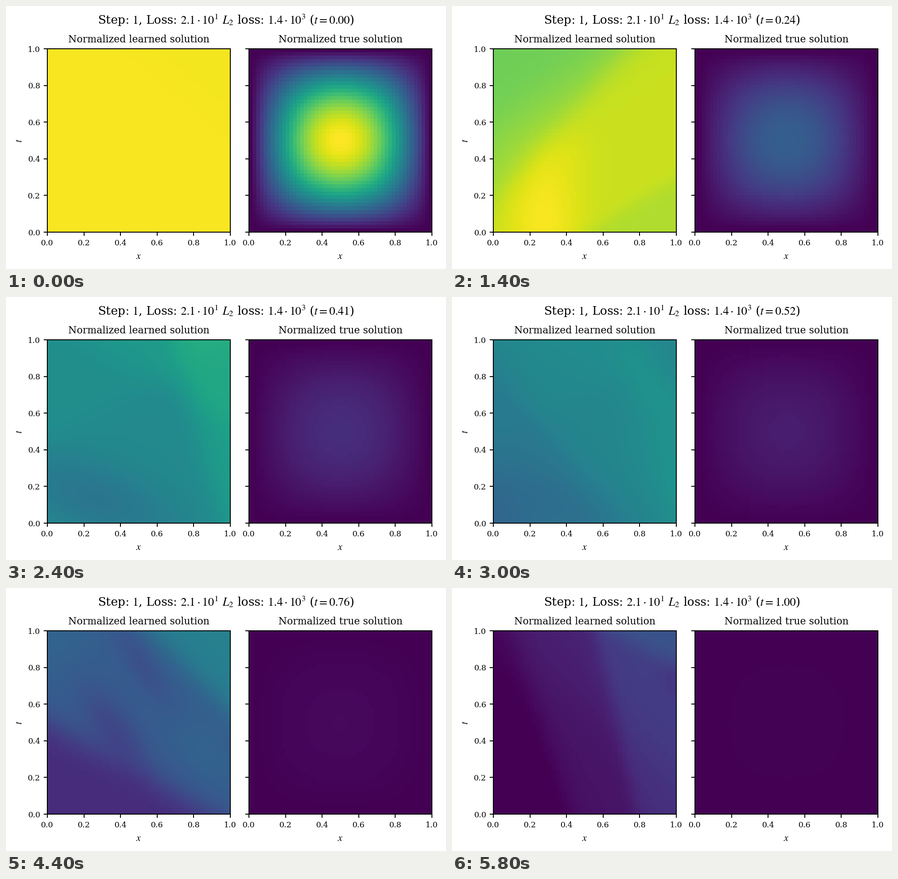
A matplotlib script for the animation above (6000 ms loop, 969 by 578 pixels).

```python
import numpy as np
import matplotlib.pyplot as plt
from matplotlib.animation import FuncAnimation

W, H, DPI = 969, 578, 155
FRAMES, INTERVAL = 30, 200
CELLS = 50
LINE = 2 * 72 / DPI  # two pixels in points

plt.rcParams.update({
    "font.family": "DejaVu Serif",
    "mathtext.fontset": "stix",
    "font.size": 10,
    "axes.titlesize": 10,
    "axes.titlepad": 6.5,
    "axes.labelsize": 10,
    "axes.linewidth": LINE,
    "xtick.labelsize": 8,
    "xtick.major.width": LINE,
    "xtick.major.pad": 4,
    "ytick.labelsize": 8,
    "ytick.major.width": LINE,
})

X, Y = np.meshgrid(np.linspace(0, 1, CELLS), np.linspace(0, 1, CELLS))


def step(amp, angle, offset, width):
    """Soft step across a straight line."""
    a = np.radians(angle)
    p = X * np.cos(a) + Y * np.sin(a)
    return amp / (1 + np.exp((offset - p) / width))


def bump(amp, x, y, angle, along, across):
    """Rotated Gaussian hill or valley."""
    a = np.radians(angle)
    u = (X - x) * np.cos(a) + (Y - y) * np.sin(a)
    v = (Y - y) * np.cos(a) - (X - x) * np.sin(a)
    return amp * np.exp(-(u / along) ** 2 - (v / across) ** 2)


# Learned surface at a few moments, blended linearly in between.
KEYS = np.array([0, 3, 7, 12, 18, 22, 29])
SURFACES = np.array([
    0.99 + step(-0.008, 50, 1.1, 0.06),
    0.987 + step(-0.042, 32, 1.16, 0.045) + bump(-0.012, 0, 1, 0, 0.2, 0.2),
    0.92 + step(-0.07, 139, 0.11, 0.04) + step(-0.07, 125, 0.45, 0.08)
    + step(-0.04, -60, 0.26, 0.025)
    + bump(0.07, 0.27, 0.05, 0, 0.2, 0.3) + bump(0.025, 0.33, 0.4, 50, 0.22, 0.18),
    0.47 + step(0.09, 15, 0.93, 0.045) + step(0.04, 60, 0.98, 0.04)
    + step(0.025, 118, 0.396, 0.04) + bump(-0.08, 0.25, 0.13, -20, 0.45, 0.19),
    0.185 + step(0.14, 40, 0.1, 0.05) + step(0.115, 34.5, 0.505, 0.055)
    + step(-0.15, 40, 1.26, 0.055) + bump(0.035, 0.95, 0.22, -60, 0.4, 0.17)
    + bump(-0.02, 0.17, 0.53, -45, 0.35, 0.05) + bump(-0.02, 0.6, 0.03, -45, 0.25, 0.1),
    0.125 + step(0.16, 61, 0.43, 0.045) + step(0.15, 45, 1.11, 0.04)
    + bump(-0.07, 0.37, 0.45, -55, 0.28, 0.11)
    + bump(-0.045, 0.52, 0.82, -58, 0.3, 0.08)
    + bump(0.03, 0.85, 0.35, -50, 0.35, 0.15) + bump(0.035, 0, 1, 0, 0.3, 0.3),
    -0.01 + step(0.06, 18, 0.405, 0.04) + step(0.075, 13, 0.77, 0.025)
    + step(0.07, 62, 1.19, 0.025) + step(0.03, 30, 0.9, 0.1)
    + step(0.03, 60, 0.75, 0.1) + bump(-0.03, 1, 0.75, 90, 0.12, 0.08),
])


def learned(i):
    k = min(np.searchsorted(KEYS, i, side="right") - 1, len(KEYS) - 2)
    f = (i - KEYS[k]) / (KEYS[k + 1] - KEYS[k])
    return np.clip((1 - f) * SURFACES[k] + f * SURFACES[k + 1], 0, 1)


def true(t):
    return np.sin(np.pi * X) * np.sin(np.pi * Y) * np.exp(-np.pi ** 2 / 2 * t)


def heading(t):
    return (r"Step: $1$, Loss: $2.1\cdot 10^{1}$ $L_2$ loss: "
            rf"$1.4\cdot 10^{{3}}$ ($t={t:.2f}$)")


# The tiny surplus keeps the pixel size from rounding down.
fig = plt.figure(figsize=((W + 1e-6) / DPI, (H + 1e-6) / DPI), dpi=DPI,
                 facecolor="white")


def panel(left, title):
    ax = fig.add_axes([left / W, (H - 497) / H, 403 / W, 403 / H])
    ax.set_title(title)
    ax.set_xlabel("$x$")
    img = ax.imshow(np.zeros((CELLS, CELLS)), cmap="viridis", vmin=0, vmax=1,
                    origin="lower", extent=(0, 1, 0, 1), aspect="auto",
                    interpolation="nearest")
    ax.set_xticks(np.linspace(0, 1, 6))
    ax.set_yticks(np.linspace(0, 1, 6))
    return ax, img


ax1, img1 = panel(91, "Normalized learned solution")
ax2, img2 = panel(535, "Normalized true solution")
ax1.set_ylabel("$t$")
ax2.tick_params(labelleft=False)
head = fig.text(0.5, (H - 40) / H, "", fontsize=12, ha="center", va="baseline")


def draw(i):
    t = i / (FRAMES - 1)
    img1.set_data(learned(i))
    img2.set_data(true(t))
    head.set_text(heading(t))
    return img1, img2, head


anim = FuncAnimation(fig, draw, frames=FRAMES, interval=INTERVAL,
                     init_func=lambda: draw(0), repeat=True, repeat_delay=0,
                     blit=False)
plt.show()
```
